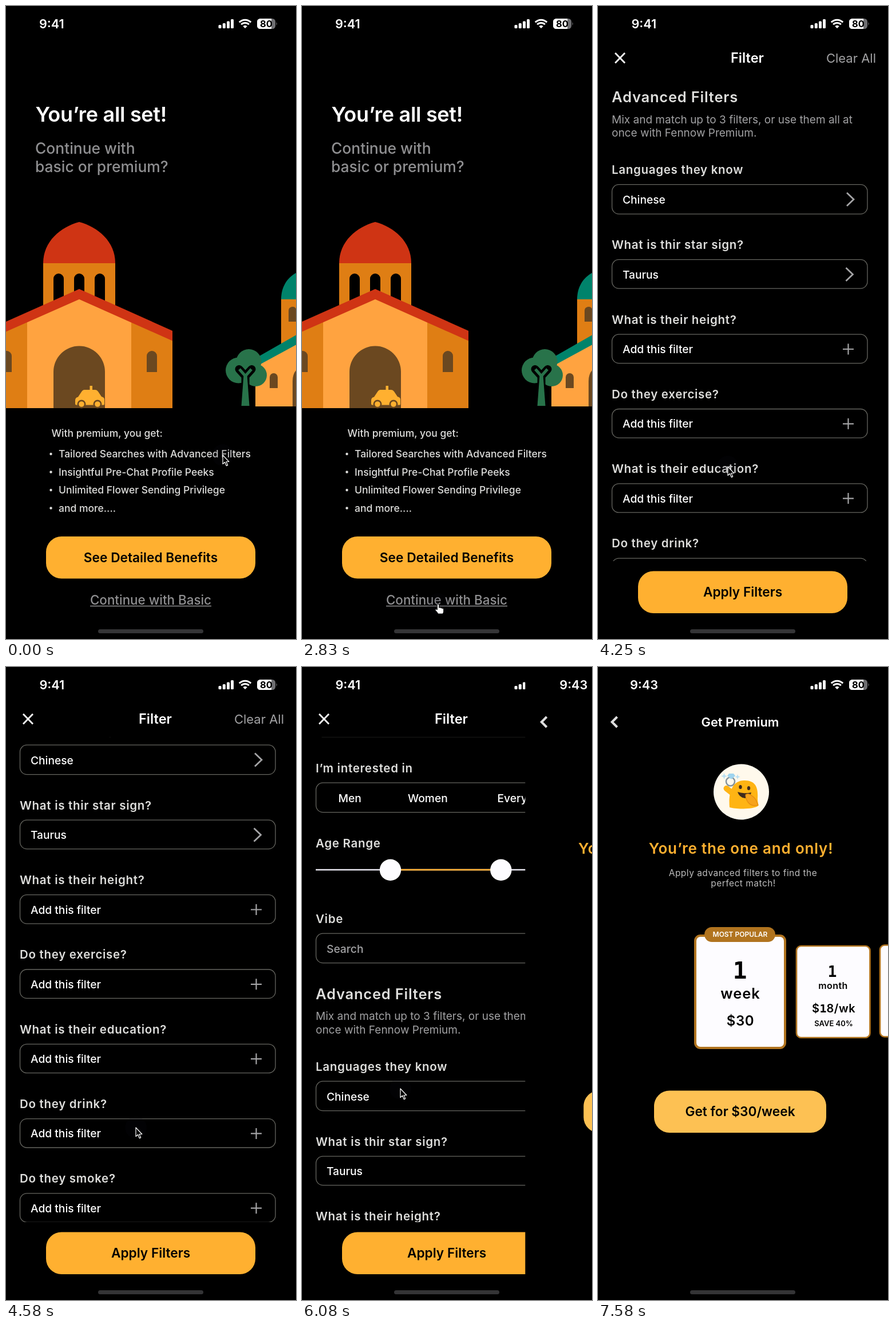
An HTML page for the animation above (9010 ms loop, 507 by 1105 pixels).

```html
<!DOCTYPE html>
<html lang="en">
<head>
<meta charset="utf-8">
<title>Premium flow</title>
<style>
  html, body { margin: 0; width: 100%; height: 100%; overflow: hidden; background: #000; }
  svg { display: block; width: 100%; height: 100%; font-family: Inter, "Open Sans", sans-serif; }
  text { white-space: pre; }
  .mid { text-anchor: middle; }
  .end { text-anchor: end; }
  .time { font-size: 21.7px; font-weight: 600; fill: #fff; }
  .h1 { font-size: 36px; font-weight: 600; letter-spacing: -.3px; fill: #fff; }
  .h2 { font-size: 26.4px; font-weight: 500; fill: #8f8f91; }
  .list { font-size: 17.5px; font-weight: 500; fill: #dededc; }
  .cta { font-size: 22.7px; font-weight: 600; fill: #000; }
  .link { font-size: 22.4px; font-weight: 500; fill: #8f8f91; }
  .label { font-size: 20.5px; font-weight: 600; letter-spacing: .7px; fill: #dededc; }
  .value { font-size: 19.2px; font-weight: 500; fill: #fff; }
  .note { font-size: 19px; fill: #a2a2a4; }
  .one { font-family: "DejaVu Sans Mono", monospace; font-weight: 700; letter-spacing: 0; }
  .card { font-weight: 600; fill: #000; }
  .box { fill: none; stroke: #666660; stroke-width: 1.3; }
  .icon { fill: none; stroke: #fff; stroke-width: 2.8; }
  .dim { stroke: #a4a4a6; }
  .brown { fill: #6b4820; }
  .light { fill: #ffa340; }
  .dark { fill: #df7e14; }
  .red { fill: #cf3414; }
  .teal { fill: #00836b; }
  .green { fill: #28734a; }
  .amber { fill: #ffb030; }
</style>
</head>
<body>
<svg viewBox="0 0 507 1105" preserveAspectRatio="none">
  <defs>
    <g id="chrome">
      <g fill="#fff">
        <rect x="371.5" y="33" width="5" height="6" rx="1.5"/>
        <rect x="378.8" y="30" width="5" height="9" rx="1.5"/>
        <rect x="386" y="26.5" width="5" height="12.5" rx="1.5"/>
        <rect x="393" y="23" width="5" height="16" rx="1.5"/>
        <path d="M414.3 35.2a5.2 5.2 0 0 1 7.4 0L418 39z"/>
      </g>
      <g fill="none" stroke="#fff" stroke-width="3">
        <path d="M407.8 28.4a14.4 14.4 0 0 1 20.4 0"/>
        <path d="M411.2 32.2a9.6 9.6 0 0 1 13.6 0"/>
      </g>
      <rect x="439" y="22" width="32" height="18" rx="5.5" fill="#6f6f72"/>
      <path d="M444.5 22H464V40H444.5A5.5 5.5 0 0 1 439 34.5V27.5A5.5 5.5 0 0 1 444.5 22z" fill="#fff"/>
      <path d="M472.5 28q2.5 3 0 6z" fill="#6f6f72"/>
      <text class="mid" x="455" y="37" font-size="16.5" font-weight="700">80</text>
      <rect x="161" y="1088" width="184" height="7" rx="3.5" fill="#343436"/>
    </g>
    <path id="dome" d="M0 72C0 34 30 9 63 0C96 9 126 34 126 72z"/>
    <clipPath id="view"><rect x="0" y="122" width="507" height="847"/></clipPath>
  </defs>

  <g id="welcome">
    <text class="time" x="58" y="39">9:41</text>
    <use href="#chrome"/>
    <text class="h1" x="51.5" y="201.5">You’re all set!</text>
    <text class="h2" x="51" y="258">Continue with</text>
    <text class="h2" x="51" y="290">basic or premium?</text>

    <use href="#dome" x="65" y="377" class="red"/>
    <path class="dark" d="M65 449H191V540H65z"/>
    <path d="M83 530V476a9 9 0 0 1 18 0V530zM119 530V476a9 9 0 0 1 18 0V530zM155 530V476a9 9 0 0 1 18 0V530z"/>
    <path class="dark" d="M0 560L128 503L291 576V702H0z"/>
    <path class="light" d="M37 545L128 503L219 545V702H37z"/>
    <path class="red" d="M0 551L128 494L291 567V584.5L128 512L0 568.5z"/>
    <path class="brown" d="M83 702V638.5a45 45 0 0 1 90 0V702zM246 639V611a9 9 0 0 1 18 0V639zM-8 639V611a9 9 0 0 1 18 0V639z"/>
    <path class="amber" d="M146.5 663h4.5v7h5q3 0 5 3l6 9q5 1 5 5v8q0 1.5-2 1.5h-47q-2 0-2-2v-6q0-5 5-6l6-9q2-3.5 5-3.5h9.5z"/>
    <g class="brown"><circle cx="132" cy="695" r="7.5"/><circle cx="160" cy="695" r="7.5"/></g>
    <g class="amber"><circle cx="132" cy="695" r="4.8"/><circle cx="160" cy="695" r="4.8"/></g>

    <path class="teal" d="M481 512C481 490 492 474 507 466V512z"/>
    <path class="dark" d="M481 512H507V600H481z"/>
    <path class="brown" d="M494 551V532a7 7 0 0 1 13-3.5V551z"/>
    <path class="light" d="M436 622L507 583V699H436z"/>
    <path class="teal" d="M436 615L507 574.5V591.5L436 630z"/>
    <path class="brown" d="M461 667V648a7 7 0 0 1 14 0V667zM501 699V655q0-12 6-19V699z"/>
    <g class="green">
      <circle cx="424.5" cy="621" r="22"/><circle cx="406.5" cy="636" r="22.5"/><circle cx="436.5" cy="644.5" r="19.5"/>
    </g>
    <path d="M407.5 634L418.5 646L429.5 634M418.5 646V664" fill="none" stroke="#000" stroke-width="14" stroke-linecap="round" stroke-linejoin="round"/>
    <path d="M408 634L418.5 646L429 634" fill="none" stroke="#28734a" stroke-width="5"/>
    <path class="green" d="M415.5 644H421.5L425.5 698H411.5z"/>

    <text class="list" x="79.5" y="752">With premium, you get:</text>
    <g id="perks"></g>
    <rect class="amber" x="70" y="926" width="366" height="73.5" rx="27"/>
    <text class="cta mid" x="253" y="971">See Detailed Benefits</text>
    <text class="link mid" x="253" y="1044.5">Continue with Basic</text>
    <path d="M147 1047.5H359" stroke="#8f8f91" stroke-width="1.5"/>
  </g>

  <g id="filter">
    <path d="M-4 0H507V1105H-4z"/>
    <text class="time" x="58.5" y="39">9:41</text>
    <use href="#chrome"/>
    <path class="icon" d="M30 82L47 99.5M47 82L30 99.5"/>
    <text class="mid" x="261" y="98.5" font-size="23.6" font-weight="600" fill="#fff">Filter</text>
    <text class="end" x="486" y="98.5" font-size="22" fill="#a2a2a4">Clear All</text>
    <g clip-path="url(#view)">
      <g id="list">
        <path d="M453.5 199L429 210L439.5 213L443.5 224z" fill="#fff"/>
        <text class="value" x="63.5" y="350.5">Men</text>
        <text class="value" x="185" y="350.5">Women</text>
        <text class="value" x="341.5" y="350.5">Everyone</text>
        <text class="label" x="24" y="430">Age Range</text>
        <text class="label end" x="470" y="430">24 - 55</text>
        <path d="M24 469H471" stroke="#e8e6f0" stroke-width="2.5"/>
        <path d="M154 469H348" stroke="#ffb030" stroke-width="2.5"/>
        <circle cx="154.5" cy="469.3" r="18.7" fill="#fdfcff"/>
        <circle cx="347.8" cy="469.3" r="18.7" fill="#fdfcff"/>
        <circle class="icon" cx="436.5" cy="603" r="7.5"/>
        <path class="icon" d="M441.5 608L451 617.5"/>
        <text x="24" y="694.5" font-size="25.5" font-weight="600" letter-spacing=".8" fill="#dededc">Advanced Filters</text>
        <text class="note" x="24" y="731">Mix and match up to 3 filters, or use them all at</text>
        <text class="note" x="24" y="754.5">once with Fennow Premium.</text>
      </g>
    </g>
    <rect class="amber" x="70" y="986.5" width="366" height="73.5" rx="27"/>
    <text class="cta mid" x="253" y="1031">Apply Filters</text>
  </g>

  <g id="premium">
    <path d="M-4 0H507V1105H-4z"/>
    <text class="time" x="56" y="39">9:43</text>
    <use href="#chrome"/>
    <path class="icon" d="M33.5 87L24.5 96L33.5 105" style="stroke:#dedede;stroke-width:4"/>
    <text class="mid" x="248.5" y="103.5" font-size="21.8" font-weight="600" fill="#fff">Get Premium</text>

    <circle cx="250.5" cy="218" r="48.5" fill="#fff9ec"/>
    <circle cx="231.5" cy="200" r="7.5" fill="none" stroke="#84939d" stroke-width="2.5"/>
    <path d="M229 186h8l3 4l-7 6l-7-6z" fill="#9fd4ee"/>
    <path d="M220.5 185l1.5 4l4 1.5l-4 1.5l-1.5 4l-1.5-4l-4-1.5l4-1.5zM244 187l1.2 3.5l3.5 1.2l-3.5 1.2l-1.2 3.5l-1.2-3.5l-3.5-1.2l3.5-1.2z" fill="#b9dff2"/>
    <path d="M236 221L224.5 212" stroke="#ffb414" stroke-width="10" stroke-linecap="round"/>
    <path d="M230 245C228 224 232 198 256 198C278 198 280 214 279 230C279 238 282 242 279 243C272 248 243 249 230 245z" fill="#ffb414"/>
    <g fill="#3f2a1c">
      <ellipse cx="249" cy="209.5" rx="2.7" ry="3.5"/><ellipse cx="263.5" cy="211.5" rx="2.7" ry="3.5"/>
      <path d="M244 218Q255 222 268 219Q266 229 257 229Q247 228 244 218z"/>
    </g>
    <path d="M258 223q5-3 10 1q6 4 8 8l4 9q-11 3-17-4q-5-6-5-14z" fill="#f7a31b" stroke="#e58a0e" stroke-width="1.2"/>

    <text class="mid" x="250" y="326" font-size="26" font-weight="600" letter-spacing=".8" fill="#ffb030">You’re the one and only!</text>
    <g class="mid" font-size="15.5" letter-spacing=".48" fill="#bdbdbd">
      <text x="253.5" y="364.5">Apply advanced filters to find the</text>
      <text x="254" y="383">perfect match!</text>
    </g>
    <g fill="#fdfcff" stroke="#b1741f">
      <rect x="170" y="469" width="157" height="196" rx="9" stroke-width="4"/>
      <rect x="347" y="487" width="128.5" height="160" rx="8" stroke-width="2.7"/>
      <rect x="493" y="485.5" width="128" height="160" rx="8" stroke-width="2.7"/>
    </g>
    <rect x="186" y="454" width="124" height="26" rx="13" fill="#b1741f"/>
    <text class="mid" x="248.5" y="471.3" font-size="12" font-weight="600" fill="#fff">MOST POPULAR</text>
    <g class="card mid">
      <text class="one" x="248" y="544" font-size="41">1</text>
      <text x="249" y="579" font-size="25.5" letter-spacing="1">week</text>
      <text x="249" y="626" font-size="24" letter-spacing=".6">$30</text>
      <text class="one" x="409.5" y="541" font-size="26">1</text>
      <text x="411" y="562" font-size="16" letter-spacing=".4">month</text>
      <text x="412" y="603" font-size="20" letter-spacing=".5">$<tspan class="one">1</tspan>8/wk</text>
      <text x="412" y="626.5" font-size="13">SAVE 40%</text>
    </g>
    <rect x="98" y="739.5" width="301" height="73.5" rx="27" fill="#fdc153"/>
    <text class="cta mid" x="248.5" y="784">Get for $30/week</text>
  </g>

  <circle id="halo" r="19" fill="#10101a" fill-opacity=".16"/>
  <g id="cursor" stroke-linejoin="round">
    <path id="arrow" d="M0 0V15.5L3.6 12.3L6.2 18.6L8.6 17.6L6 11.5H10.8z" fill="#000" stroke="#fff" stroke-width="1.2"/>
    <path id="hand" d="M-1.5 1.5Q0 -1 1.5 1.5V6.5Q3 5 4.3 6.8Q6 6 7 7.8Q9 7 9.5 9V13Q9.5 15 8 17H0Q-2 13.5 -5 10.5Q-4.5 8 -1.5 10z" fill="#fff" stroke="#000" stroke-width=".8"/>
  </g>
</svg>
<script>
const $ = id => document.getElementById(id);

// Static rows
['Tailored Searches with Advanced Filters', 'Insightful Pre-Chat Profile Peeks',
 'Unlimited Flower Sending Privilege', 'and more....'].forEach((s, i) => {
  const y = 782 + i * 31.5;
  $('perks').innerHTML += `<circle cx="78.5" cy="${y}" r="2.2" fill="#dededc"/>
    <text class="list" x="92" y="${y + 6}">${s}</text>`;
});

const chevron = (x, y) => `<path class="icon dim" d="M${x} ${y - 11.5}l12 11.5l-12 11.5"/>`;
const plus = y => `<path class="icon dim" style="stroke-width:2.2" d="M428 ${y}h19M437.5 ${y - 9.5}v19"/>`;

// One labelled field; top is the upper edge of its frame
function field(label, top, height, value = '', icon = '', fill = '#fff') {
  const mid = top + height / 2;
  $('list').insertAdjacentHTML('afterbegin', `<text class="label" x="24" y="${top - 18.5}">${label}</text>
    <rect class="box" x="24.5" y="${top + .2}" width="446.5" height="${height - .6}" rx="12"/>
    <text class="value" x="43" y="${mid + 7.5}" style="fill:${fill}">${value}</text>${icon}`);
}
field('Location', 185, 52, 'Current Location (Dapplewick)');
field('I’m interested in', 317, 52);
field('Vibe', 580, 52, 'Search', '', '#a2a2a4');
field('Languages they know', 838, 52, 'Chinese', chevron(435, 864));
field('What is thir star sign?', 969, 51, 'Taurus', chevron(433.5, 995));
['What is their height?', 'Do they exercise?', 'What is their education?', 'Do they drink?', 'Do they smoke?']
  .forEach((s, i) => {
    const top = 1099.5 + i * 130.3;
    field(s, top, 51, 'Add this filter', plus(top + 26));
  });

// Motion: time, x, y of the pointer
const LOOP = 9010, STEP = 1000 / 12;
const path = [
  [0, 379, 784], [250, 290, 700], [500, 179, 604], [583, 189, 577], [750, 189, 577],
  [917, 202, 740], [1083, 210, 982], [1167, 212, 1029], [1333, 246, 1052], [1500, 246, 1050],
  [1667, 222, 1042], [1750, 226, 1043], [2333, 226, 1043], [2500, 238, 1044], [3500, 238, 1044],
  [3750, 227, 807], [3833, 227, 804], [5417, 227, 804], [5667, 190, 736], [5750, 190, 736],
  [5833, 172, 736], [6333, 172, 736], [6917, 174, 740], [7583, 350, 1108]
];
const span = (t, a, b) => Math.min(1, Math.max(0, (t - a) / (b - a)));
const out = p => 1 - (1 - p) ** 2;

function pointer(t) {
  const i = path.findIndex(k => k[0] > t);
  if (i < 1) return path[i < 0 ? path.length - 1 : 0].slice(1);
  const [t0, x0, y0] = path[i - 1], [t1, x1, y1] = path[i], p = span(t, t0, t1);
  return [x0 + (x1 - x0) * p, y0 + (y1 - y0) * p];
}

// cubic-bezier(0, 0, .58, 1)
function easeOut(p) {
  let lo = 0, hi = 1;
  for (let i = 0; i < 24; i++) {
    const s = (lo + hi) / 2;
    if (1.74 * (1 - s) * s * s + s ** 3 < p) lo = s; else hi = s;
  }
  return 3 * (1 - lo) * lo * lo + lo ** 3;
}

const move = (id, x, y) => $(id).setAttribute('transform', `translate(${x.toFixed(2)} ${y.toFixed(2)})`);
const show = (id, on) => $(id).setAttribute('visibility', on ? 'visible' : 'hidden');

function slide(id, t, start) {
  const p = easeOut(span(t, start, start + 400));
  show(id, t > start);
  move(id, 507 * (1 - p), 0);
}

function draw(now) {
  // The picture advances on a 12 fps grid
  const t = Math.floor((now % LOOP + 4) / STEP) * STEP;
  slide('filter', t, 2834);
  slide('premium', t, 6027);
  move('list', 0, -702 * out(span(t, 3917, 4583)) + 587 * out(span(t, 5000, 5666)));
  move('cursor', ...pointer(t));
  move('halo', ...pointer(t - STEP));
  const hand = t > 1740 && t < 3550, gone = t > 7575;
  show('arrow', !hand && !gone);
  show('hand', hand);
  show('halo', !gone);
}

const start = performance.now();
function tick() {
  draw(performance.now() - start);
  requestAnimationFrame(tick);
}
tick();
</script>
</body>
</html>
```
